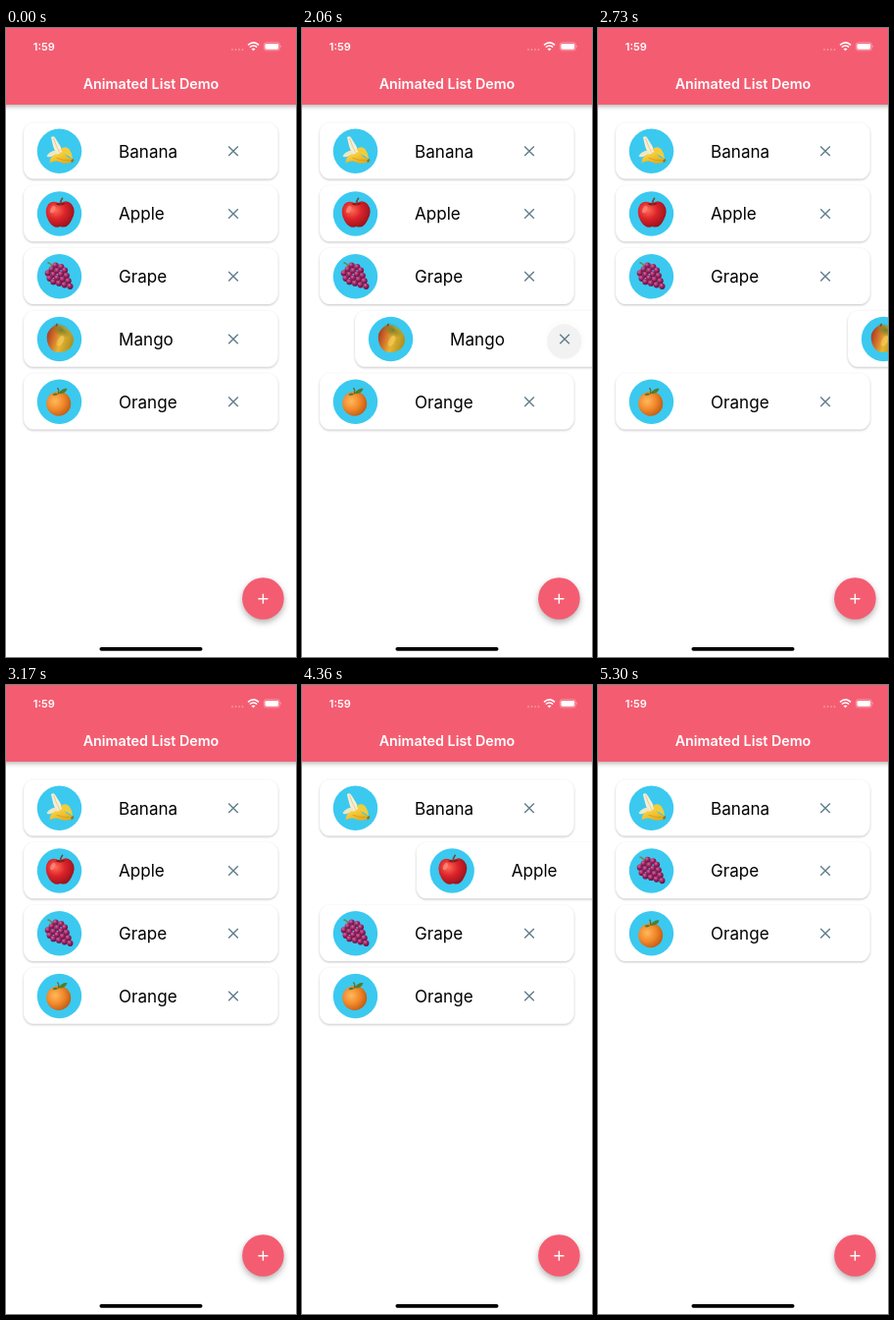
An HTML page for the animation above (5.35 s loop, 296 by 640 pixels).

```html
<!DOCTYPE html>
<html lang="en">
<head>
<meta charset="utf-8">
<title>Animated List Demo</title>
<style>
  html, body { margin: 0; width: 100%; height: 100%; overflow: hidden; background: #fff; }
  svg { display: block; width: 100%; height: 100%; font-family: Inter, "Open Sans", sans-serif; }
  .card { fill: #fff; filter: drop-shadow(0 1.3px .8px rgba(0,0,0,.23)); }
  .bar { fill: #f45d71; filter: drop-shadow(0 2px 2px rgba(0,0,0,.28)); }
  .fab { fill: #f45d71; filter: drop-shadow(0 3px 3px rgba(0,0,0,.3)); }
  .line { fill: none; stroke-width: 1.4; }
</style>
</head>
<body>
<svg viewBox="0 0 296 640">
  <defs>
    <radialGradient id="red" cx=".35" cy=".35" r=".75">
      <stop stop-color="#ff6a55"/><stop offset=".45" stop-color="#dc2329"/><stop offset="1" stop-color="#8f101b"/>
    </radialGradient>
    <radialGradient id="orange" cx=".36" cy=".4" r=".72">
      <stop stop-color="#ffb95c"/><stop offset=".5" stop-color="#f1882a"/><stop offset="1" stop-color="#b9540f"/>
    </radialGradient>
    <radialGradient id="purple" cx=".35" cy=".3" r=".8">
      <stop stop-color="#d9689c"/><stop offset=".45" stop-color="#9c2262"/><stop offset="1" stop-color="#4f0f36"/>
    </radialGradient>
    <linearGradient id="mango" x1="0" y1=".3" x2="1" y2=".6">
      <stop stop-color="#a33a24"/><stop offset=".25" stop-color="#cf6a2a"/>
      <stop offset=".55" stop-color="#e9b431"/><stop offset="1" stop-color="#a98f22"/>
    </linearGradient>
    <radialGradient id="unripe">
      <stop stop-color="#75802a"/><stop offset="1" stop-color="#75802a" stop-opacity="0"/>
    </radialGradient>
    <linearGradient id="peel" x1="0" y1="0" x2=".7" y2="1">
      <stop stop-color="#ffe14f"/><stop offset="1" stop-color="#e6ab1c"/>
    </linearGradient>

    <g id="Banana">
      <path d="M-8.500 -14Q-6 -16.500 -4 -13Q1 -6 4 2L-2 6Q-7 -4 -8.500 -14Z" fill="#f8eed2"/>
      <path d="M-6 -13Q-3 -4 1 3" fill="none" stroke="#dfcda0" stroke-width="1"/>
      <path d="M-3 -1Q-10 0 -13 5Q-12 7 -8 5.500L-1 5Z" fill="#efe6c4"/>
      <path d="M1 -2Q6 -6 10 -2Q13 2 13.500 8Q9 4 5 3Z" fill="#f2cd3a"/>
      <path d="M-4 3Q-10 6 -10 12Q-4 9 0 11Q6 14 12 11L14 8Q7 7 3 0Q0 4 -4 3Z" fill="url(#peel)"/>
      <path d="M-3 7Q4 10 11 9.500" fill="none" stroke="#d19c1d" stroke-width=".8"/>
      <path d="M11.500 9.500L14 7.500L15 10L12.500 12Z" fill="#8d7a2b"/>
    </g>
    <g id="Apple">
      <g transform="translate(0 -1) scale(1.120)">
        <path d="M.5 -8Q6 -13 11 -8Q16 -2 11 7Q7 15 1 12.500Q-5 15 -9.500 8Q-15 -1 -10 -8Q-5 -12 .5 -8Z" fill="url(#red)"/>
        <path d="M-4 -8Q1 -5 6 -8.500Q1 -10 -4 -8Z" fill="#8c171b"/>
        <path d="M.8 -7.500Q1 -11 3 -13.500" fill="none" stroke="#71482b" stroke-width="1.400"/>
        <ellipse cx="-6" cy="-3" rx="2" ry="3.500" fill="#ffb09d" opacity=".5" transform="rotate(25 -6 -3)"/>
      </g>
    </g>
    <g id="Grape"></g>
    <g id="Mango">
      <path id="mangoSkin" d="M-6 -13Q0 -16 7 -11Q15 -6 14.500 2Q13 11 4 13Q-4 15 -9 10Q-14 3 -12.500 -5Q-10 -11 -6 -13Z" fill="url(#mango)"/>
      <ellipse cx="2" cy="-9" rx="11" ry="6.500" fill="url(#unripe)" transform="rotate(28 2 -9)"/>
      <path d="M-3.500 -13L-2 -15.500" stroke="#6d4d26" stroke-width="1.500"/>
      <ellipse cx="1" cy="2" rx="3" ry="6" fill="#ffe17a" opacity=".4" transform="rotate(30 1 2)"/>
    </g>
    <g id="Orange">
      <circle cx="-.8" cy="2" r="12.500" fill="url(#orange)"/>
      <path d="M-1 -8Q-6 -10 -7 -7Q-4 -5 -1 -8Q2 -14 8 -13.500Q7 -8 -1 -8Z" fill="#4d7f2e"/>
      <path d="M-1 -8Q0 -12 -2 -14" fill="none" stroke="#5d6a27" stroke-width="1.200"/>
    </g>
  </defs>

  <rect width="296" height="640" fill="#fff"/>
  <g id="list"></g>

  <rect class="bar" x="-5" y="-5" width="306" height="83"/>
  <g fill="#fff">
    <text x="27.800" y="23" font-size="11" font-weight="600">1:59</text>
    <text x="148" y="62.300" font-size="14.300" font-weight="600" text-anchor="middle">Animated List Demo</text>
    <g opacity=".5">
      <circle cx="231" cy="22" r=".8"/><circle cx="234.500" cy="22" r=".8"/>
      <circle cx="238" cy="22" r=".8"/><circle cx="241.500" cy="22" r=".8"/>
    </g>
    <path d="M250.500 21.200Q252.500 19.700 254.500 21.200L252.500 23.200Z"/>
    <path d="M248.900 19.500Q252.500 16.500 256.100 19.500M247 17.300Q252.500 12.600 258 17.300" fill="none" stroke="#fff" stroke-width="1.600"/>
    <rect x="263.300" y="14.800" width="16" height="8" rx="2.300" fill="none" stroke="#fff" stroke-width=".7" opacity=".5"/>
    <rect x="264.400" y="15.900" width="13.800" height="5.800" rx="1.400"/>
    <path d="M280.300 17.500Q281.600 18.800 280.300 20.100Z" opacity=".6"/>
  </g>

  <circle class="fab" cx="262.400" cy="580.500" r="21.300"/>
  <path class="line" d="M257.400 580.700h10m-5 -5v10" stroke="#fff"/>
  <rect x="95.500" y="630" width="105" height="3.700" rx="1.850"/>
</svg>

<script>
const LOOP = 5350, PITCH = 63.75, TOP = 125.2;
// Moments at which the picture refreshes while a card slides out.
const TICKS = [
  1890, 1970, 2050, 2130, 2210, 2280, 2360, 2430, 2510, 2580, 2650, 2730, 2810, 2880, 2950, 3020,
  4010, 4080, 4170, 4260, 4350, 4440, 4550, 4620, 4690, 4790, 4890, 4980, 5080
];
const items = [
  { name: 'Banana' },
  { name: 'Apple', start: 3992, speed: .2757, gone: 5080 },
  { name: 'Grape' },
  { name: 'Mango', start: 1928, speed: .2956, gone: 3020 },
  { name: 'Orange' }
];

function drawGrapes() {
  const rows = [3, 4, 4, 3, 2, 1];
  let out = '<path d="M-7 -9Q-8 -13 -12 -14" fill="none" stroke="#728437" stroke-width="1.5"/>';
  rows.forEach((count, row) => {
    for (let i = 0; i < count; i++) {
      const across = (i - (count - 1) / 2) * 5.7, along = row * 4.8 - 10;
      const x = along * .78 + across * .68, y = along * .72 - across * .68;
      out += `<circle cx="${x.toFixed(1)}" cy="${y.toFixed(1)}" r="3.1" fill="url(#purple)"/>`;
    }
  });
  document.getElementById('Grape').innerHTML = out;
}

function rowMarkup({ name }) {
  return `<g>
    <rect class="card" x="18" y="-28.900" width="259.700" height="57.300" rx="11"/>
    <circle cx="54.500" cy="0" r="22.700" fill="#3bc9f0"/>
    <use href="#${name}" x="54.500" y="0"/>
    <text x="115" y="6.300" font-size="17.100">${name}</text>
    <g class="ripple"><circle cx="232" cy="1" r="21" opacity=".025"/><circle class="splash" cx="231.700" cy="2.500" opacity=".09"/></g>
    <path class="line" d="M227.200 -4.800l9.600 9.600m0 -9.600l-9.600 9.600" stroke="#607d8b"/>
  </g>`;
}

drawGrapes();
const list = document.getElementById('list');
list.innerHTML = items.map(rowMarkup).join('');
items.forEach((item, i) => {
  item.row = list.children[i];
  item.ripple = item.row.querySelector('.ripple');
  item.splash = item.row.querySelector('.splash');
});

function render(time) {
  const t = TICKS.reduce((last, tick) => tick <= time ? tick : last, 0);
  let slot = 0;
  for (const { start, speed, gone, row, ripple, splash } of items) {
    const removed = t >= gone;
    const age = start ? Math.max(0, t - start) : 0;
    row.style.display = removed ? 'none' : '';
    row.setAttribute('transform', `translate(${age * (speed || 0)} ${TOP + slot * PITCH})`);
    ripple.setAttribute('opacity', age ? Math.max(0, Math.min(1, 1.1 - age / 200)) : 0);
    splash.setAttribute('r', Math.min(21, 14 + age * .03));
    if (!removed) slot++;
  }
}

function frame() {
  render(performance.now() % LOOP);
  requestAnimationFrame(frame);
}
frame();
</script>
</body>
</html>
```
